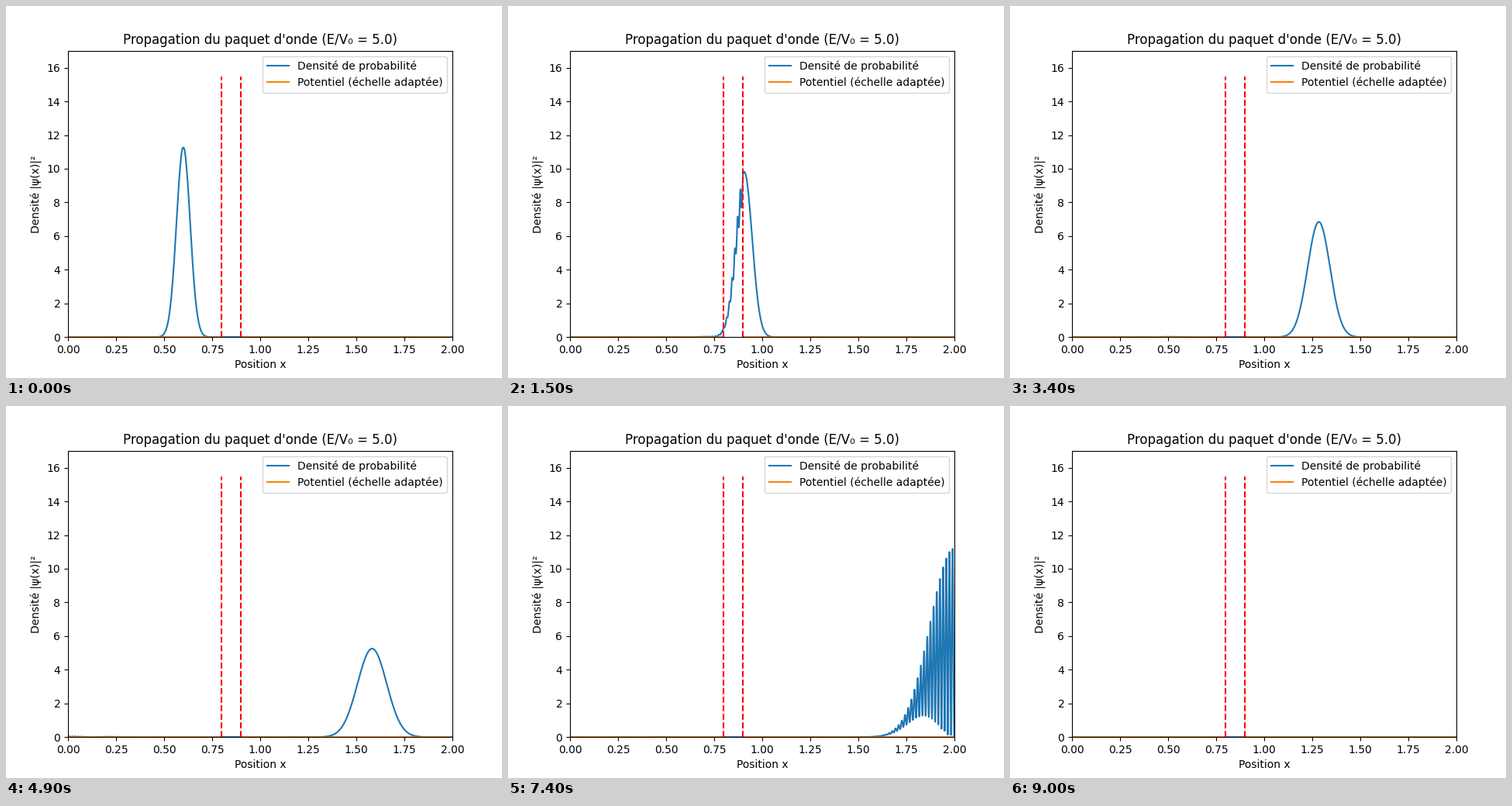
Write a matplotlib script that moves like this. It is 640 px wide and 480 px high and loops after 9100 ms.

```python
import math

import matplotlib.pyplot as plt
import numpy as np
from matplotlib.animation import FuncAnimation

# Grid and time stepping
DT = 1e-7
DX = 0.001
NX = 2000
STEPS_PER_FRAME = 1000
N_FRAMES = 91

# Wave packet and potential well
XC, SIGMA = 0.6, 0.05
V0 = -4000
RATIO = 5.0
WELL = (0.8, 0.9)


def simulate(x, v):
    """Leapfrog solution of the Schrodinger equation, one density per frame."""
    k = math.sqrt(2 * abs(RATIO * V0))
    amp = 1 / math.sqrt(SIGMA * math.sqrt(math.pi))
    psi = amp * np.exp(1j * k * x - (x - XC) ** 2 / (2 * SIGMA ** 2))
    re, im = psi.real.copy(), psi.imag.copy()
    s = DT / DX ** 2
    c = 2 * (s + v[1:-1] * DT)

    # The last row stays empty: the run stops just before it.
    density = np.zeros((N_FRAMES, NX))
    for step in range((N_FRAMES - 1) * STEPS_PER_FRAME // 2):
        frame, rest = divmod(2 * step, STEPS_PER_FRAME)
        if rest == 0:
            before = im[1:-1].copy()
        im[1:-1] += s * (re[2:] + re[:-2]) - c * re[1:-1]
        if rest == 0:
            density[frame, 1:-1] = re[1:-1] ** 2 + im[1:-1] * before
        re[1:-1] -= s * (im[2:] + im[:-2]) - c * im[1:-1]
    return density


x = np.linspace(0, (NX - 1) * DX, NX)
v = np.where((x >= WELL[0]) & (x <= WELL[1]), V0, 0.0)
density = simulate(x, v)
top = density.max()

fig, ax = plt.subplots(figsize=(6.4, 4.8), dpi=100)
line, = ax.plot(x, density[0], label="Densité de probabilité")
ax.plot(x, v / abs(V0) * top, label="Potentiel (échelle adaptée)")
ax.vlines(WELL, 0, top, colors="red", linestyles="--")
ax.set_xlim(0, 2)
ax.set_ylim(0, 1.1 * top)
ax.set_title(f"Propagation du paquet d'onde (E/V₀ = {RATIO})")
ax.set_xlabel("Position x")
ax.set_ylabel("Densité |ψ(x)|²")
ax.legend(loc="upper right")


def update(frame):
    line.set_ydata(density[frame])
    return line,


anim = FuncAnimation(fig, update, frames=N_FRAMES, interval=100, repeat=True)
plt.show()
```
